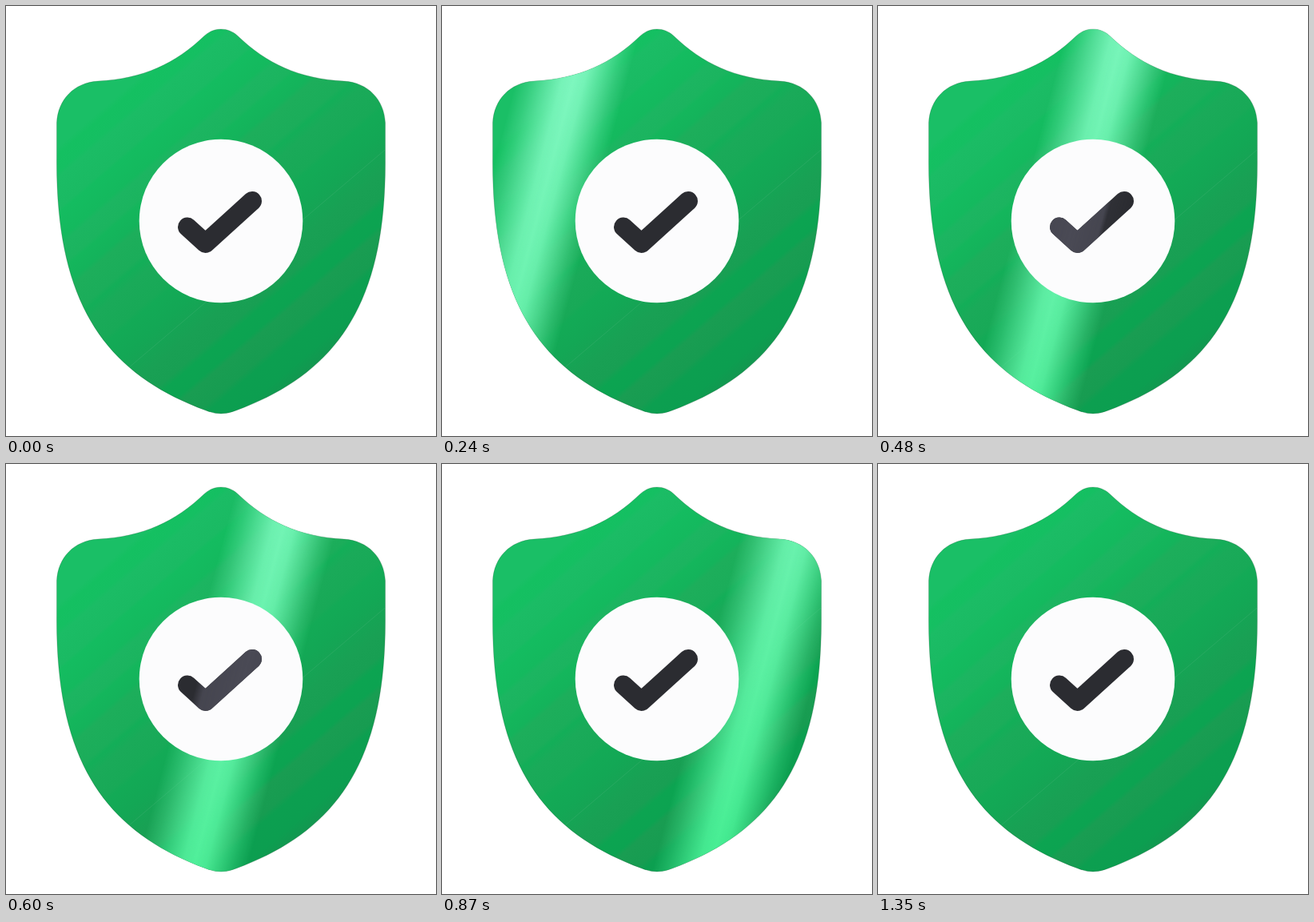
Recreate the animation shown at these times as an HTML page. Size 538 by 538 pixels, loop 1.55 s.

```html
<!DOCTYPE html>
<html lang="en">
<head>
<meta charset="utf-8">
<title>Shield sheen</title>
<style>
  html, body { margin: 0; width: 100%; height: 100%; overflow: hidden; background: #fff; }
  svg { display: block; width: 100vw; height: 100vh; }
</style>
</head>
<body>
<svg viewBox="0 0 538 538">
  <defs>
    <path id="shield" d="M269 29C261 29 254 32 248 37.5C212 72 172 91 115 94C85 96 65 117 63.5 146V190
      C62 375 126 460 250 506Q269 514 288 506C412 460 476 375 474.5 190V146C473 117 453 96 423 94
      C366 91 326 72 290 37.5C284 32 277 29 269 29Z"/>
    <path id="tick" d="M227 276.5L249.5 297L308 244" fill="none" stroke-width="24"
      stroke-linecap="round" stroke-linejoin="round"/>
    <clipPath id="inside"><use href="#shield"/></clipPath>
    <linearGradient id="base" gradientUnits="userSpaceOnUse" x1="77.8" y1="91.4" x2="388.8" y2="457.2"/>
    <linearGradient id="bright" gradientUnits="userSpaceOnUse" x1="77.8" y1="91.4" x2="388.8" y2="457.2">
      <stop offset="0" stop-color="#84f8c4"/>
      <stop offset=".5" stop-color="#6af2ae"/>
      <stop offset="1" stop-color="#46ee93"/>
    </linearGradient>
    <linearGradient id="soft">
      <stop offset="0" stop-color="#fff" stop-opacity="0"/>
      <stop offset=".13" stop-color="#fff" stop-opacity=".27"/>
      <stop offset=".26" stop-color="#fff" stop-opacity=".59"/>
      <stop offset=".4" stop-color="#fff" stop-opacity=".92"/>
      <stop offset=".5" stop-color="#fff"/>
      <stop offset=".6" stop-color="#fff" stop-opacity=".92"/>
      <stop offset=".73" stop-color="#fff" stop-opacity=".59"/>
      <stop offset=".86" stop-color="#fff" stop-opacity=".24"/>
      <stop offset=".97" stop-color="#fff" stop-opacity="0"/>
    </linearGradient>
    <linearGradient id="flat">
      <stop offset=".1" stop-color="#fff" stop-opacity="0"/>
      <stop offset=".18" stop-color="#fff" stop-opacity=".85"/>
      <stop offset=".5" stop-color="#fff"/>
      <stop offset=".74" stop-color="#fff" stop-opacity=".85"/>
      <stop offset=".78" stop-color="#fff" stop-opacity=".15"/>
      <stop offset=".95" stop-color="#fff" stop-opacity="0"/>
    </linearGradient>
    <mask id="softBand" maskUnits="userSpaceOnUse" x="0" y="0" width="538" height="538">
      <rect class="band" x="-72" y="-269" width="144" height="538" fill="url(#soft)"/>
    </mask>
    <mask id="flatBand" maskUnits="userSpaceOnUse" x="0" y="0" width="538" height="538">
      <rect class="band" x="-72" y="-269" width="144" height="538" fill="url(#flat)"/>
    </mask>
  </defs>
  <use href="#shield" fill="url(#base)" stroke="#0b4a28" stroke-opacity=".35" stroke-width=".7"/>
  <path d="M150 455.5L500 158" stroke="#4bb57b" stroke-opacity=".4" stroke-width=".8" clip-path="url(#inside)"/>
  <g mask="url(#softBand)"><use href="#shield" fill="url(#bright)"/></g>
  <circle cx="269" cy="269" r="102.3" fill="#fcfcfd"/>
  <use href="#tick" stroke="#2b2c31"/>
  <g mask="url(#flatBand)"><use href="#tick" stroke="#4a4a55"/></g>
</svg>
<script>
const LOOP = 1550, STEP = 30, END = 1350;

// Diagonal shades of the shield: [distance from the upper left, colour]
const shades = [
  [136, '#1abf66'], [176, '#1abf66'], [184, '#14c061'], [200, '#15bf62'], [206, '#1bbc65'],
  [236, '#1aba63'], [240, '#14bc60'], [266, '#14b95e'], [272, '#1cb561'], [292, '#1bb45f'],
  [297, '#14b65c'], [314, '#14b35b'], [320, '#1dae5b'], [348, '#1bad5a'], [354, '#13ae58'],
  [366, '#1aaa59'], [396, '#18a957'], [402, '#13aa56'], [428, '#13a755'], [464, '#19a054'],
  [486, '#189f53'], [494, '#0ca451'], [512, '#0ca351'], [518, '#199d52'], [542, '#179c51'],
  [550, '#0c9f50'], [576, '#0c9e50'], [592, '#139750']
];
const base = document.getElementById('base');
for (const [dist, colour] of shades) {
  const stop = document.createElementNS('http://www.w3.org/2000/svg', 'stop');
  stop.setAttribute('offset', (dist - 120) / 480);
  stop.setAttribute('stop-color', colour);
  base.append(stop);
}

// Sheen centre at mid height: [ms, x]
const path = [[0, -48], [240, 118], [360, 188], [600, 297], [870, 398], [1110, 468], [1350, 528]];

function slope(i) {
  const a = path[Math.max(0, i - 1)], b = path[Math.min(path.length - 1, i + 1)];
  return (b[1] - a[1]) / (b[0] - a[0]);
}

function sheenX(t) {
  if (t <= 0 || t >= END) return -400;
  const i = path.findIndex(p => p[0] > t) - 1;
  const [t0, x0] = path[i], [t1, x1] = path[i + 1];
  const d = t1 - t0, u = (t - t0) / d, v = 1 - u;
  return x0 * (1 + 2 * u) * v * v + slope(i) * d * u * v * v
       + x1 * u * u * (3 - 2 * u) - slope(i + 1) * d * u * u * v;
}

const bands = document.querySelectorAll('.band');
const start = performance.now();

function draw(now) {
  const t = Math.max(0, now - start) % LOOP;
  const x = sheenX(Math.floor(t / STEP) * STEP);
  for (const band of bands) band.setAttribute('transform', `translate(${x} 269) skewX(-14.8)`);
  requestAnimationFrame(draw);
}
draw(start);
</script>
</body>
</html>
```
